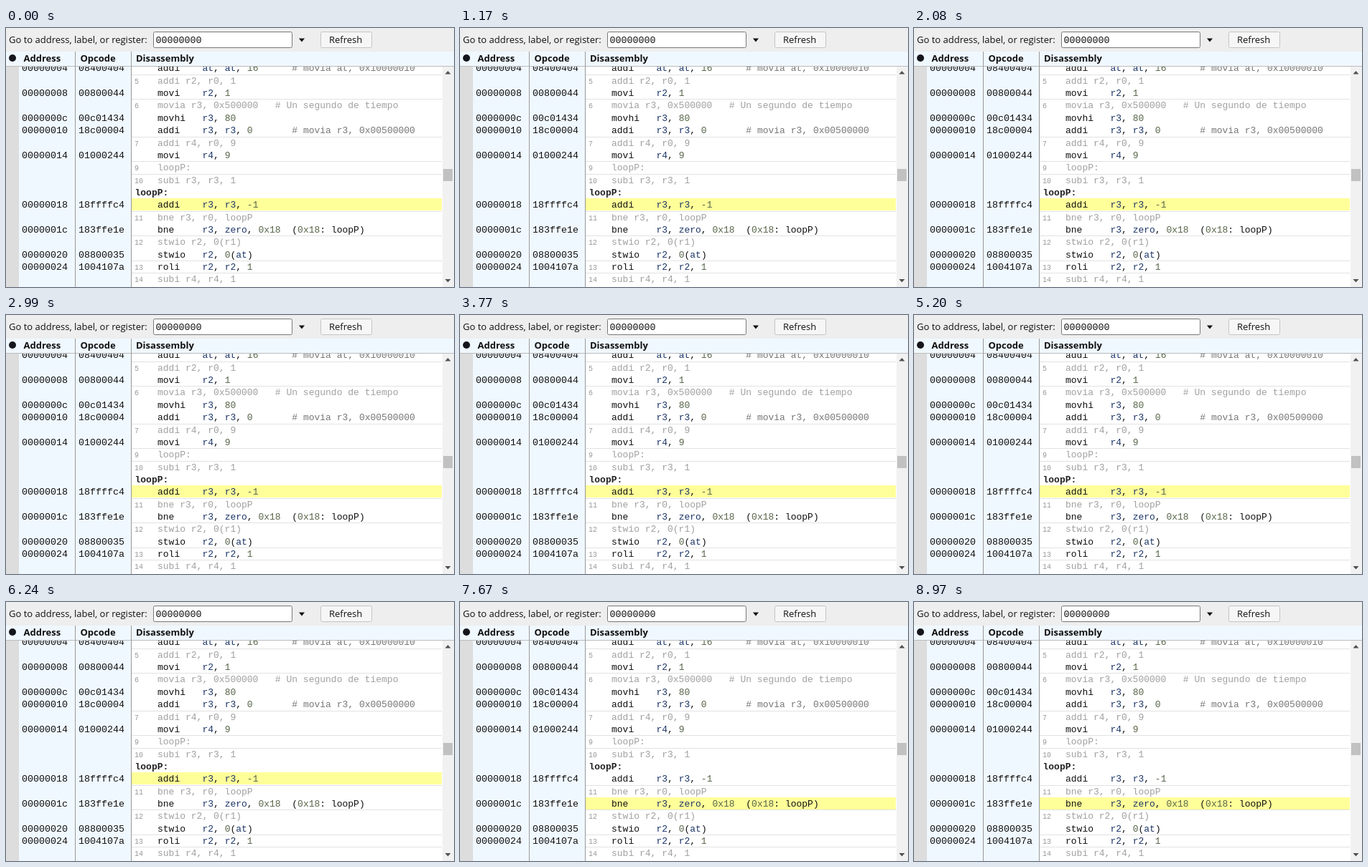
These frames come from a looping animation (624x362 px, 9100 ms). An HTML page:

```html
<!DOCTYPE html>
<html lang="en">
<head>
<meta charset="utf-8">
<title>Disassembly stepping</title>
<style>
html, body { margin: 0; width: 100%; height: 100%; overflow: hidden; background: #fff; }
svg { display: block; }
text { white-space: pre; font: 13px "Open Sans", sans-serif; fill: #111; }
.head { font-weight: bold; }
.mono { font: 13.33px "Liberation Mono", monospace; }
.code { font: 13px "Liberation Mono", monospace; }
.num { font: 10px "Liberation Mono", monospace; fill: #999; }
.label { font-weight: bold; fill: #222; }
.src { fill: #a0a0a0; }
.reg { fill: #1c3566; }
.imm { fill: #58664a; }
.note { fill: #777; }
</style>
</head>
<body>
<svg width="624" height="362" viewBox="0 0 624 362">
  <rect width="624" height="362" fill="#fff"/>
  <rect y="53" width="18" height="309" fill="#ddd"/>
  <rect x="18" y="53" width="156" height="309" fill="#f0f8ff"/>
  <rect id="mark" x="175" width="432" height="17" fill="#ffff99"/>
  <g id="rows"></g>

  <rect x="608" y="53" width="16" height="309" fill="#f1f1f1"/>
  <rect x="609" y="197" width="13" height="17" fill="#c1c1c1"/>
  <path d="M611.5 64.5h8l-4-4.5zM611.5 351h8l-4 4.5z" fill="#505050"/>

  <rect y="33" width="624" height="20" fill="#f0f8ff"/>
  <path d="M0 53.5H624" stroke="#bbb"/>
  <path d="M96.5 33V362M174.5 33V362" stroke="#999"/>
  <circle cx="9" cy="42" r="5" fill="#15151c"/>
  <text class="head" x="24.5" y="47">Address</text>
  <text class="head" x="103.5" y="47">Opcode</text>
  <text class="head" x="181" y="47">Disassembly</text>

  <rect width="624" height="33" fill="#eee"/>
  <text x="4" y="21">Go to address, label, or register:</text>
  <rect x="205.5" y="5.5" width="193" height="22" rx="2" fill="#fff" stroke="#777"/>
  <text class="mono" x="208.5" y="21">00000000</text>
  <path d="M408 14.5h8l-4 5z" fill="#111"/>
  <rect x="438.5" y="5.5" width="71" height="22" rx="2" fill="#f6f6f6" stroke="#c4c4c4"/>
  <text x="450" y="21">Refresh</text>
</svg>
<script>
// Each row: source line number, address, opcode, text
const listing = `
||00000004|08400404|addi    at, at, 16      # movia at, 0x10000010
5|||addi r2, r0, 1
|00000008|00800044|movi    r2, 1
6|||movia r3, 0x500000   # Un segundo de tiempo
|0000000c|00c01434|movhi   r3, 80
|00000010|18c00004|addi    r3, r3, 0       # movia r3, 0x00500000
7|||addi r4, r0, 9
|00000014|01000244|movi    r4, 9
9|||loopP:
10|||subi r3, r3, 1
|||loopP:
|00000018|18ffffc4|addi    r3, r3, -1
11|||bne r3, r0, loopP
|0000001c|183ffe1e|bne     r3, zero, 0x18  (0x18: loopP)
12|||stwio r2, 0(r1)
|00000020|08800035|stwio   r2, 0(at)
13|00000024|1004107a|roli    r2, r2, 1
14|||subi r4, r4, 1`.trim().replace(/^\|\|/, '|').split('\n').map(row => row.split('|'));

const baseline = i => Math.round(60.4 + 17.35 * i);
const text = (cls, x, y, body) => `<text class="${cls}" x="${x}" y="${y}">${body}</text>`;

const paint = code => code.replace(/(#.*)|\b(r\d|at|zero)\b|(-?\b(?:0x)?\d+\b)/g,
  (part, note, reg) => `<tspan class="${note ? 'note' : reg ? 'reg' : 'imm'}">${part}</tspan>`);

document.getElementById('rows').innerHTML = listing.map(([num, address, opcode, code], i) => {
  const y = baseline(i);
  const rule = num ? `<path d="M175 ${y - 12.5}H607" stroke="#e2e2e2"/>` + text('num', 179, y, num) : '';
  if (address) return rule + text('mono', 22, y, address) + text('mono', 101, y, opcode) +
    text('code', 211, y, paint(code));
  return rule + (num ? text('code src', 211, y, code) : text('code label', 179.5, y, code));
}).join('');

const loop = 9100, stepAt = 6890;
const mark = document.getElementById('mark');
const start = performance.now();

function draw() {
  const time = (performance.now() - start) % loop;
  mark.setAttribute('y', baseline(time < stepAt ? 11 : 13) - 13);
  requestAnimationFrame(draw);
}
draw();
</script>
</body>
</html>
```
